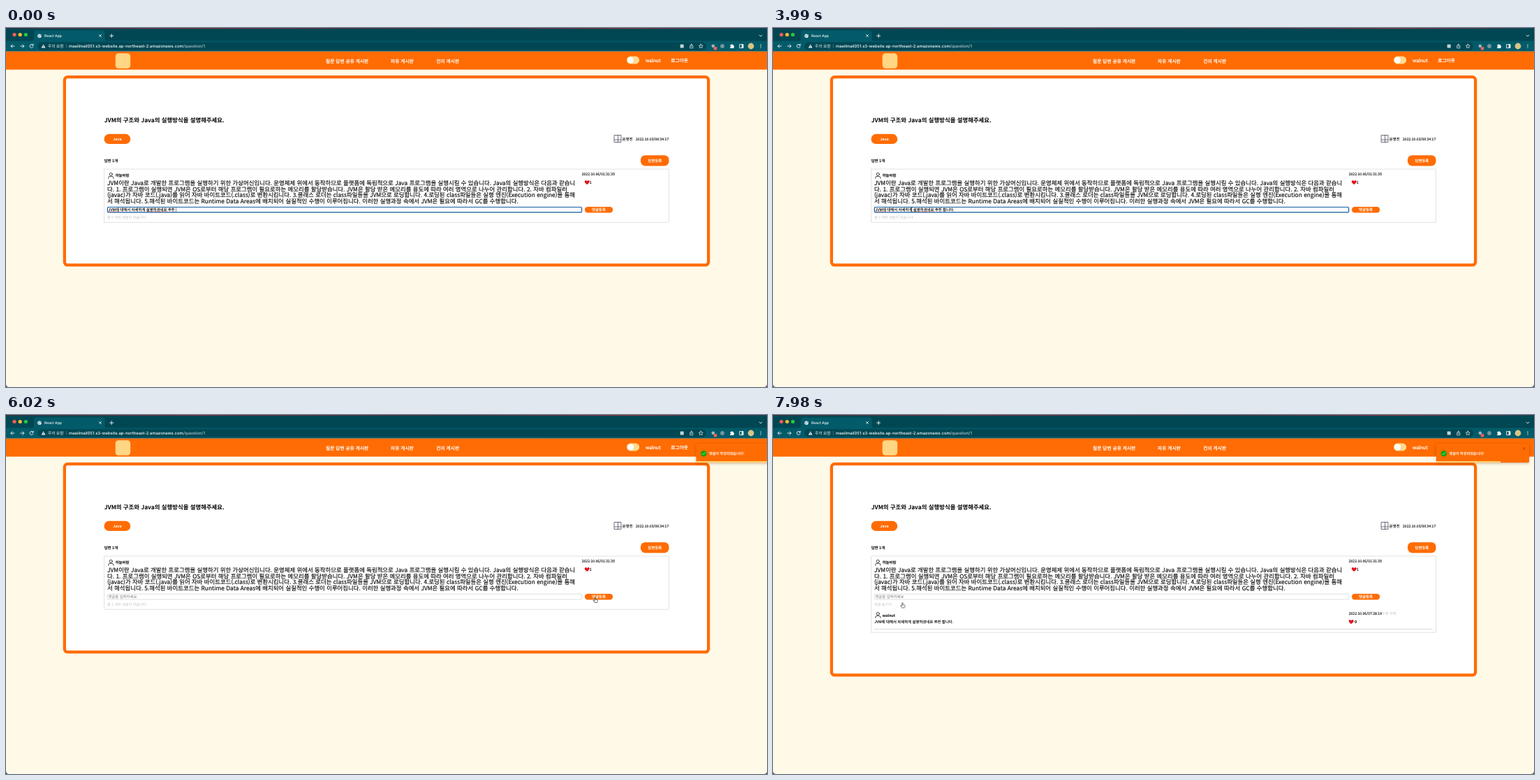
Write an HTML page that moves like this. It is 1090 by 514 pixels and loops after 8000 ms.

```html
<!DOCTYPE html>
<html lang="ko">
<head>
<meta charset="utf-8">
<title>Q&amp;A board</title>
<style>
html, body { margin: 0; width: 100%; height: 100%; overflow: hidden; background: #fff9e8; }
svg { display: block; width: 1090px; height: 514px; }
text { font: 400 5.1px "Noto Sans CJK KR", "Noto Sans CJK JP", "Noto Sans CJK", sans-serif; text-rendering: geometricPrecision; white-space: pre; fill: #000; stroke-width: .12px; }
.ui { font-family: Inter, "Noto Sans CJK KR", sans-serif; font-size: 5.7px; font-weight: 500; fill: #fff; }
.tab { font-size: 5.05px; }
.url { font-size: 5.9px; }
.mid { font-size: 5.37px; }
.nav { font-size: 6.72px; fill: #fff; stroke: #fff; stroke-width: .22px; }
.body { font-size: 8.405px; }
.body, .mid, .date { stroke: #000; }
.bold { font-weight: 700; stroke: none; }
.btn { font-size: 5.4px; font-weight: 700; fill: #fff; text-anchor: middle; }
.pale { fill: #bdbdbd; }
.hint { fill: #757575; stroke: none; }
.main { fill: #ff6c03; }
.line { fill: none; stroke-linecap: round; stroke-linejoin: round; }
#composing { text-decoration: underline; }

.grow { height: var(--h); animation: grow 8s step-end infinite; }
@keyframes grow {
  0% { height: var(--h); }
  97.125%, 100% { height: calc(var(--h) + 33px); }
}

#pointer { animation: travel 8s linear infinite; }
@keyframes travel {
  0%, 49.875% { transform: translate(198px, 260px); }
  51.625% { transform: translate(262px, 233px); }
  53.375% { transform: translate(400px, 190px); }
  55.125% { transform: translate(560px, 180px); }
  56.875% { transform: translate(710px, 200px); }
  58.625% { transform: translate(815px, 245px); }
  60.375%, 83.5% { transform: translate(844px, 261px); }
  85.75% { transform: translate(800px, 276px); }
  87.5% { transform: translate(640px, 290px); }
  89.25% { transform: translate(450px, 292px); }
  91% { transform: translate(290px, 284px); }
  92.75% { transform: translate(200px, 272px); }
  93.625%, 100% { transform: translate(185.5px, 268.5px); }
}

#toast { filter: drop-shadow(0 1px 2px rgba(0, 0, 0, .22)); animation: bounce 8s cubic-bezier(.215, .61, .355, 1) infinite; }
@keyframes bounce {
  0%, 71.625% { transform: translateX(1275px); }
  76.875% { transform: translateX(-10.6px); }
  78.19% { transform: translateX(4.2px); }
  79.5% { transform: translateX(-2.1px); }
  80.375%, 100% { transform: none; }
}

#progress { transform-origin: 950px 0; animation: drain 8s linear infinite; }
@keyframes drain {
  0%, 80.375% { transform: scaleX(1); }
  100% { transform: scaleX(.69); }
}
</style>
</head>
<body>
<svg viewBox="0 0 1090 514">
  <defs>
    <linearGradient id="edge">
      <stop offset="0" stop-color="#35303f"/><stop offset=".25" stop-color="#8a2f3d"/>
      <stop offset=".6" stop-color="#40303f"/><stop offset=".82" stop-color="#a03240"/>
      <stop offset="1" stop-color="#1f3f50"/>
    </linearGradient>
    <g id="person" class="line" stroke="#222" stroke-width=".85">
      <circle cy="-1.8" r="2"/>
      <path d="M-3.5 4.2V3.2Q-3.5 1.2 -1.4 1.2H1.4Q3.5 1.2 3.5 3.2V4.2"/>
    </g>
    <path id="heart" fill="#e3131f" d="M0 3C-1.3 1.8 -3.5 .4 -3.5 -1.2C-3.5 -3.2 -.8 -3.4 0 -1.6C.8 -3.4 3.5 -3.2 3.5 -1.2C3.5 .4 1.3 1.8 0 3Z"/>
    <path id="arrow" stroke="#fff" stroke-width=".6" d="M0 0V7L1.7 5.5L2.8 8L4 7.5L2.9 5H5Z"/>
    <path id="hand" fill="#fff" stroke="#222" stroke-width=".65" stroke-linejoin="round" d="M-.6 .5Q0 -.4 .6 .5V3L3 3.6Q3.8 4 3.5 5L2.8 7.5H-.8L-2.8 4.7Q-2.6 3.6 -1.5 4.3L-.6 5Z"/>
    <circle id="ring" r="12.7" fill="#fff" fill-opacity=".45" stroke="#000" stroke-width="1.4"/>
  </defs>

  <!-- browser window -->
  <rect width="1090" height="34" fill="#014753"/>
  <rect width="1090" height="1" fill="url(#edge)"/>
  <circle cx="12" cy="9.5" r="2.6" fill="#fe5f57"/>
  <circle cx="20.2" cy="9.5" r="2.6" fill="#febc2e"/>
  <circle cx="28.4" cy="9.5" r="2.6" fill="#28c840"/>
  <path fill="#035b69" d="M0 18.5H37Q40 18.5 40 15.5V7Q40 3.5 43.5 3.5H138Q141.5 3.5 141.5 7V15.5Q141.5 18.5 144.5 18.5H1090V33.7H0Z"/>
  <rect x="45" y="20.3" width="958" height="11.4" rx="5.7" fill="#014753"/>
  <circle cx="48" cy="11.2" r="2.8" fill="#e3eef0"/>
  <path class="line" stroke="#035b69" stroke-width=".6" d="M46 10Q48 11 47.5 13M48.5 9Q49 11.5 50.3 11.6"/>
  <text class="ui tab" x="55" y="13">React App</text>
  <g class="line" stroke="#fff" stroke-width=".85">
    <path d="M133.6 9.7l2.8 2.8m0-2.8l-2.8 2.8M151.2 8.7v5m-2.5-2.5h5M1079 10.2l1.9 1.9 1.9-1.9"/>
    <path d="M12 26H7m2.2-2.3L6.9 26l2.3 2.3M20.8 26h5m-2.2-2.3l2.3 2.3-2.3 2.3"/>
    <path d="M38.8 24.6A2.5 2.5 0 1 0 39 26.8M39.1 23v1.9h-1.9"/>
    <path stroke-width=".65" d="M980.6 25.2h-.9v3.6h4.2v-3.6h-.9M981.8 27v-4m-1.2 1.2l1.2-1.2 1.2 1.2"/>
    <path stroke-width=".65" d="M995.3 23l.9 2 2.1.2-1.6 1.4.5 2.1-1.9-1.1-1.9 1.1.5-2.1-1.6-1.4 2.1-.2z"/>
    <rect x="1051" y="23.5" width="5" height="5" stroke-width=".8"/>
  </g>
  <path fill="#e6eff1" d="M53.6 23.2l2.9 5.2h-5.8z"/>
  <path stroke="#014753" stroke-width=".7" d="M53.6 25v1.6m0 .5v.6"/>
  <text class="ui" x="60" y="28.2">주의 요함</text>
  <path stroke="#6f959c" stroke-width=".5" d="M86.3 23v6"/>
  <text class="ui url" x="90" y="28.1">maeilmail051.s3-website.ap-northeast-2.amazonaws.com<tspan fill="#b4cbd0">/question/1</tspan></text>
  <rect x="965.7" y="23.6" width="5" height="5" rx=".7" fill="#bfd3d7"/>
  <circle cx="1012.8" cy="25.8" r="2.3" fill="#9db6bc"/>
  <rect x="1013.7" y="27" width="4.6" height="4.6" rx="1" fill="#e8635a"/>
  <circle cx="1026" cy="26" r="2.9" fill="#7595a0"/>
  <path fill="#fff" d="M1037.2 24.2h1.5a1 1 0 0 1 2 0h1.5v1.6a1 1 0 0 1 0 2v1.3h-5v-1.5a1 1 0 0 0 0-2z"/>
  <path fill="#fff" d="M1053.7 23.5h2.3v5h-2.3z"/>
  <circle cx="1067" cy="26" r="4.4" fill="#d8c484"/>
  <g fill="#fff"><circle cx="1081" cy="23.9" r=".65"/><circle cx="1081" cy="26" r=".65"/><circle cx="1081" cy="28.1" r=".65"/></g>

  <!-- site header -->
  <rect y="33.7" width="1090" height="480.3" fill="#fff9e8"/>
  <rect class="main" y="33.7" width="1090" height="25.9"/>
  <rect x="156.7" y="36.2" width="21.5" height="21.5" rx="4.5" fill="#ffd684"/>
  <text class="nav" x="458" y="49.6">질문 답변 공유 게시판</text>
  <text class="nav" x="551" y="49.6">자유 게시판</text>
  <text class="nav" x="616.3" y="49.6">건의 게시판</text>
  <rect x="889" y="40.6" width="18.2" height="10.8" rx="5.4" fill="#ffda8c"/>
  <circle cx="894.6" cy="46" r="4.5" fill="#fff"/>
  <text class="nav" x="916" y="48.8">walnut</text>
  <text class="nav" x="952.3" y="48.8">로그아웃</text>

  <!-- question -->
  <rect class="main grow" x="81.7" y="68" width="926.6" rx="6.5" style="--h:273.6px"/>
  <rect class="grow" x="86" y="72.3" width="918" rx="2.2" fill="#fff" style="--h:265px"/>
  <text class="body bold" x="140.7" y="134.6">JVM의 구조와 Java의 실행방식을 설명해주세요.</text>
  <rect class="main" x="140.5" y="151.8" width="37.8" height="14.2" rx="7.1"/>
  <text class="btn" x="159.4" y="160.9">Java</text>
  <path class="line" stroke="#33334a" stroke-width=".7" d="M871.5 153.5h9.5v10h-9.5zM876.6 153.5v10M871.5 160h9.5"/>
  <text class="mid" x="882.8" y="160.8">운영진</text>
  <text class="date" x="902" y="160.7">2022.10.03/08:34:17</text>
  <text class="mid bold" x="140.7" y="192">답변 1개</text>
  <rect class="main" x="909" y="182.2" width="40.6" height="15.2" rx="6.5"/>
  <text class="btn" x="929.4" y="191.5">답변등록</text>

  <!-- answer -->
  <rect class="grow" x="140.7" y="202" width="808.7" fill="none" stroke="#d6d6d6" stroke-width=".7" style="--h:76.2px"/>
  <use href="#person" x="150.3" y="211.2"/>
  <text class="mid bold" x="156.7" y="213.4">하늘바람</text>
  <text class="date" x="824.7" y="211">2022.10.06/01:31:35</text>
  <use href="#heart" x="832.3" y="221.2"/>
  <text class="mid" x="835.8" y="223">1</text>
  <text class="body" x="145" y="225.3">JVM이란 Java로 개발한 프로그램을 실행하기 위한 가상머신입니다. 운영체제 위에서 동작하므로 플랫폼에 독립적으로 Java 프로그램을 실행시킬 수 있습니다. Java의 실행방식은 다음과 같습니</text>
  <text class="body" x="145" y="233.8">다. 1. 프로그램이 실행되면 JVM은 OS로부터 해당 프로그램이 필요로하는 메모리를 할당받습니다. JVM은 할당 받은 메모리를 용도에 따라 여러 영역으로 나누어 관리합니다. 2. 자바 컴파일러</text>
  <text class="body" x="145" y="242.3">(javac)가 자바 코드(.java)를 읽어 자바 바이트코드(.class)로 변환시킵니다. 3.클래스 로더는 class파일들을 JVM으로 로딩합니다. 4.로딩된 class파일들은 실행 엔진(Execution engine)을 통해</text>
  <text class="body" x="145" y="250.8">서 해석됩니다. 5.해석된 바이트코드는 Runtime Data Areas에 배치되어 실질적인 수행이 이루어집니다. 이러한 실행과정 속에서 JVM은 필요에 따라서 GC를 수행합니다.</text>

  <!-- comment field -->
  <rect x="145.3" y="256.3" width="679.4" height="7.8" rx="1" fill="#fff" stroke="#c8c8c8" stroke-width=".6"/>
  <g data-on="0 4830">
    <rect x="145.4" y="256.5" width="679.2" height="7.4" rx="1.4" fill="none" stroke="#1b62a3" stroke-width="1.2"/>
    <path stroke="#e0463c" stroke-width=".7" stroke-dasharray="1.1 .4" d="M147 262.8h15M202 262.8h29.5"/>
  </g>
  <g data-on="0 5670">
    <text id="typed" class="mid" x="146.6" y="261.8"><tspan id="done"></tspan><tspan id="composing"></tspan></text>
    <rect id="caret" y="257.3" width=".5" height="5.6"/>
  </g>
  <text class="mid hint" data-on="5670 8000" x="146.4" y="261.9">댓글을 입력하세요</text>
  <rect class="main" x="829" y="256" width="40.2" height="8.4" rx="4.2"/>
  <text class="btn" x="849" y="261.7">댓글등록</text>
  <text class="pale" data-on="0 5670" x="145" y="273">총 0 개의 댓글이 있습니다.</text>
  <text class="pale" data-on="5670 7770" x="145" y="273">총 1 개의 댓글이 있습니다.</text>

  <!-- opened comments -->
  <g data-on="7770 8000">
    <text class="pale" x="145" y="273">댓글 숨기기</text>
    <use href="#person" x="150.3" y="286.3"/>
    <text class="mid bold" x="156.5" y="288.6">walnut</text>
    <text class="mid" x="145.3" y="297.8">JVM에 대해서 자세하게 설명하셨네요 추천 합니다.</text>
    <text class="date" x="824.7" y="286">2022.10.06/07:29:18</text>
    <text class="pale" x="872.3" y="286">수정 삭제</text>
    <use href="#heart" x="828.2" y="296.2"/>
    <text class="mid bold" x="832.9" y="298">0</text>
    <path stroke="#c9c9c9" stroke-width=".7" d="M145 306.6H945"/>
  </g>

  <!-- notice -->
  <g id="toast">
    <rect class="main" x="950" y="41" width="133" height="27.2" rx="1.7"/>
    <circle cx="960.8" cy="55.2" r="4.2" fill="#07a50c"/>
    <path class="line" stroke="#fff" stroke-width=".9" stroke-opacity=".75" d="M958.8 55.3l1.4 1.4 2.7-3"/>
    <text class="bold" x="968.6" y="57" style="fill:#fff">댓글이 작성되었습니다!</text>
    <path class="line" stroke="#a84a08" stroke-width=".8" d="M1074.4 46.4l3.2 3.2m0-3.2l-3.2 3.2"/>
    <rect id="progress" x="950" y="66.2" width="133" height="2" fill="#ffda7c"/>
  </g>

  <!-- mouse -->
  <g id="pointer">
    <use href="#ring" data-on="4830 5110"/>
    <use href="#ring" data-on="7490 7770"/>
    <path data-on="3990 4130" class="line" stroke="#222" stroke-width=".6" d="M-1.1 -3Q0 -3 0 -2.2Q0 -3 1.1 -3M0 -2.2V2.2M-1.1 3Q0 3 0 2.2Q0 3 1.1 3"/>
    <use href="#arrow" data-on="4130 4690"/>
    <use href="#hand" data-on="4690 6790"/>
    <use href="#arrow" data-on="6790 7420"/>
    <use href="#hand" data-on="7420 8000"/>
  </g>
  <path fill="#39434a" d="M0 509.5Q0 514 4.5 514H0ZM1090 509.5Q1090 514 1085.5 514H1090Z"/>
</svg>
<script>
const LOOP = 8000;
const PREFIX = 'JVM에 대해서 자세하게 설명하셨네요 추천 ';
// time, committed text, syllable being composed, caret shown
const keys = [
  [0, '', '', 1], [70, '', 'ㅎ'], [210, '', '하'], [560, '', '합'],
  [700, '합', 'ㄴ'], [770, '합', '니'], [980, '합니', 'ㄷ'], [1470, '합니', '다'],
  [1610, '합니', '', 1], [1750, '합', '', 1], [1960, '', '', 1],
  [2100, '', 'ㅎ'], [2170, '', '하'], [2310, '', '합'], [2520, '합', 'ㄴ'],
  [2590, '합', '니'], [2730, '합', '닏'], [2870, '합니', '다'],
  [3010, '합니다.', '', 1], [3570, '합니다.', '']
];
const el = id => document.getElementById(id);
const typed = el('typed'), done = el('done'), composing = el('composing'), caret = el('caret');
const timed = [...document.querySelectorAll('[data-on]')].map(node => {
  const [from, to] = node.dataset.on.split(' ').map(Number);
  return { node, from, to };
});
let start, shown;

function type(t) {
  const key = keys.findLast(k => k[0] <= t);
  if (key === shown) return;
  shown = key;
  done.textContent = PREFIX + key[1];
  composing.textContent = key[2];
  caret.setAttribute('x', 146.6 + typed.getComputedTextLength());
  caret.style.display = key[3] ? '' : 'none';
}

function draw(now) {
  start ??= now;
  const t = (now - start) % LOOP;
  for (const { node, from, to } of timed) node.style.display = t >= from && t < to ? '' : 'none';
  type(t);
  requestAnimationFrame(draw);
}
requestAnimationFrame(draw);
</script>
</body>
</html>
```
